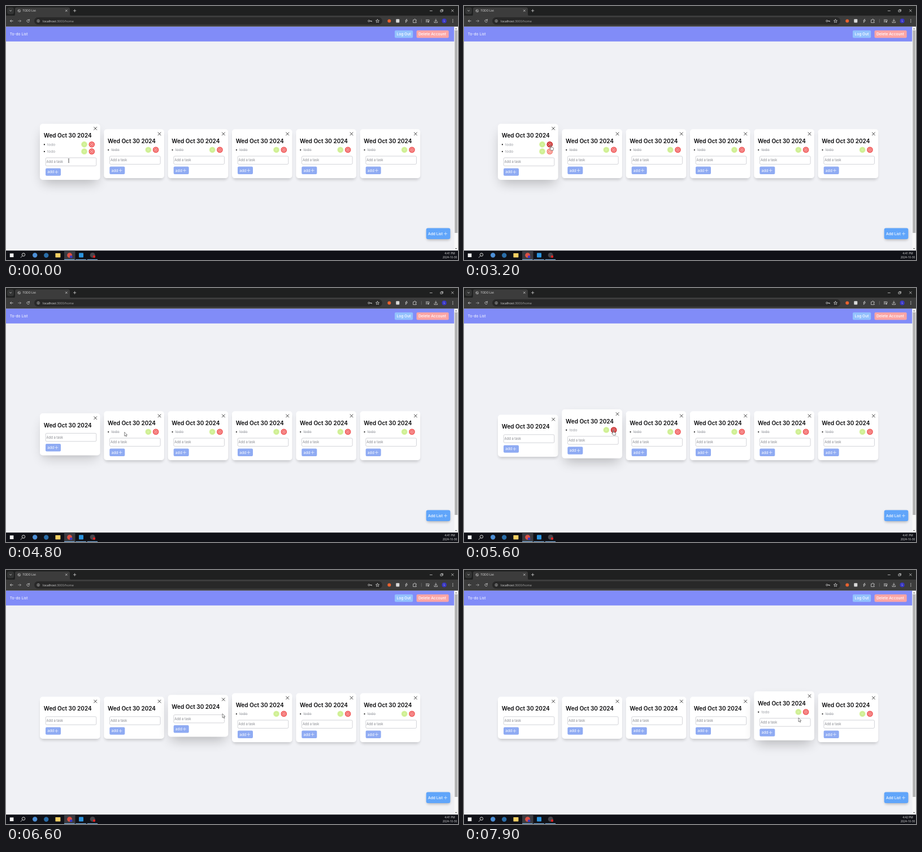
These frames come from a looping animation (800 by 450 pixels, 8 s). An HTML page:

```html
<!DOCTYPE html>
<html lang="en">
<head>
<meta charset="utf-8">
<title>To-do List</title>
<style>
  html, body { margin: 0; width: 100%; height: 100%; overflow: hidden; background: #f0f1f5; }
  svg { display: block; width: 100vw; height: 100vh; }
  text { font-family: Inter, sans-serif; font-size: 6.67px; white-space: pre; }
  .ui { font-family: "Open Sans", sans-serif; font-size: 5px; fill: #e3e3e3; }
  .line { fill: none; stroke: #d0d0d0; stroke-width: .8; stroke-linecap: round; stroke-linejoin: round; }
  .title { font-size: 10px; font-weight: 600; fill: #08080a; }
  .hint { font-size: 5.83px; fill: #85878d; }
  .white { fill: #fff; }
  .plus { stroke: #fff; stroke-width: .6; }
</style>
</head>
<body>
<svg id="stage" viewBox="0 0 800 450" xmlns="http://www.w3.org/2000/svg"></svg>
<script>
const LOOP = 8000, STEP = 100;
const CARD_W = 106.6, PITCH = 113.33, MID_Y = 261.7;
const BASE_H = 74.4, ROW_H = 12.4, LIFT = 3.33;
const RED_X = 91.8, GREEN_X = 78.5, ROW_Y = 36.5;

// Per card: pointer enters, pointer leaves, clicks that each remove a task
const cards = [
  { enter: -999, leave: 4720, tasks: 2, clicks: [4000, 4400] },
  { enter: 4790, leave: 5960, tasks: 1, clicks: [5800] },
  { enter: 6030, leave: 6660, tasks: 1, clicks: [6450] },
  { enter: 6710, leave: 7560, tasks: 1, clicks: [7200] },
  { enter: 7590, leave: 9999, tasks: 1, clicks: [] },
  { enter: 9999, leave: 9999, tasks: 1, clicks: [] }
];

// Pointer path: time, x, y
const path = [
  [0, 111, 274], [400, 124, 269], [900, 152, 264], [1200, 154.5, 263],
  [1350, 154.5, 263], [1700, 154, 254.5], [2700, 154, 254.5], [2900, 154, 247],
  [4660, 154, 247], [4800, 209.7, 255.3], [5100, 245, 256], [5500, 264, 252],
  [5850, 264, 252], [6200, 377.5, 251.5], [6500, 377.5, 251.5], [6600, 383, 254.6],
  [6850, 484, 254], [7000, 491, 252], [7500, 491, 252], [7700, 575, 258], [7900, 592, 261.8]
];

const clamp = v => Math.max(0, Math.min(1, v));
const rect = (x, y, w, h, fill, r = 0, more = '') =>
  `<rect x="${x}" y="${y}" width="${w}" height="${h}" rx="${r}" fill="${fill}" ${more}/>`;
const dot = (x, y, r, fill, more = '') => `<circle cx="${x}" cy="${y}" r="${r}" fill="${fill}" ${more}/>`;
const text = (x, y, s, more = '') => `<text x="${x}" y="${y}" ${more}>${s}</text>`;
const line = (d, more = '') => `<path class="line" d="${d}" ${more}/>`;
const plus = (x, y) => `<path class="plus" d="M${x - 3} ${y}h6m-3-3v6"/>`;
const cross = (x, y, r, more) =>
  line(`M${x - r} ${y - r}l${2 * r} ${2 * r}m0 ${-2 * r}l${-2 * r} ${2 * r}`, more);

// Tailwind's default easing: cubic-bezier(.4, 0, .2, 1)
function ease(x) {
  x = clamp(x);
  let lo = 0, hi = 1;
  for (let i = 0; i < 20; i++) {
    const s = (lo + hi) / 2;
    const bx = 1.2 * s * (1 - s) ** 2 + .6 * s * s * (1 - s) + s ** 3;
    if (bx < x) lo = s; else hi = s;
  }
  return lo * lo * (3 - 2 * lo);
}

function browser() {
  return rect(0, 0, 800, 18, '#1f2020') +
    rect(2, 2.5, 12, 12, '#343535', 3.5) + line('M6.5 7.7l1.6 1.5 1.6-1.5') +
    `<path d="M13 17.5q3 0 3-3V5.5q0-3 3-3h91q3 0 3 3v9q0 3 3 3z" fill="#3c3c3c"/>` +
    dot(23.3, 8.5, 2.3, 'none', 'stroke="#c4c4c4" stroke-width=".7"') +
    line('M21.3 8.2h2l1.2 2', 'stroke-width=".6"') +
    text(29.5, 10.3, 'TODO List', 'class="ui"') +
    cross(106.8, 8.3, 1.5) + line('M119.4 8.3h4.4m-2.2-2.2v4.4') +
    line('M750.3 8.6h4') + line('M769.3 7.3h3v3h-3zM770.4 6.3h3v3') + cross(790.3, 8.3, 1.8) +
    rect(0, 17, 800, 19.5, '#3c3c3c') + rect(50, 20, 616, 13, '#282828', 6.5) +
    line('M12.2 26.5h-4.8m2-2l-2 2 2 2') +
    line('M21.6 26.5h4.8m-2-2l2 2-2 2', 'opacity=".65"') +
    line('M41 25a2.3 2.3 0 1 0 .4 2.2M41.3 23.6v1.8h-1.8') +
    dot(57.2, 26.5, 2.3, 'none', 'stroke="#cfcfcf" stroke-width=".6"') + line('M57.2 26.3v1.4m0-2.5v.1') +
    text(65, 28.5, 'localhost<tspan fill="#a5a5a5">:3000/home</tspan>', 'class="ui" style="font-size:5.6px"') +
    dot(642.3, 26.5, 1.5, 'none', 'stroke="#d0d0d0" stroke-width=".8"') + line('M643.9 26.5h3.4v1.2m-1.3-1.2v1') +
    line('M657.5 23.6l.9 2 2.1.2-1.6 1.4.5 2.1-1.9-1.1-1.9 1.1.5-2.1-1.6-1.4 2.1-.2z', 'stroke-width=".6"') +
    dot(678.3, 26.4, 3, '#e8622f') + rect(690.3, 23.2, 6, 6.4, '#d9d9d9', 1) +
    line('M707.4 29l.6-2.5-1.2-.2 2.2-3 .3 0-.4 2.2 1.2.2z', 'stroke-width=".7"') +
    line('M721 24.6h1.6q0-1.6 1-1.6t1 1.6h1.6v1.5q-1.3 0-1.3 1t1.3 1v1.4H721z') +
    line('M735.3 23.6v5.6', 'opacity=".35"') +
    line('M743.3 24.4h4.6m-4.6 1.9h3m-3 1.9h2') + dot(747.5, 28.2, 1.1, '#d0d0d0') + line('M748.4 28v-3h1') +
    line('M760.8 23.2v4m-1.8-1.6l1.8 1.7 1.8-1.7M758 27.7v1.7h5.6v-1.7') +
    dot(775.6, 26.4, 4.1, '#3937c4') + text(775.6, 28.1, 'L', 'class="ui" text-anchor="middle" style="font-size:4.4px"') +
    [24, 26.4, 28.8].map(y => dot(790.8, y, .7, '#d6d6d6')).join('');
}

function page() {
  return rect(0, 36.5, 793.4, 26.3, '#818cf8') +
    text(6.7, 52.2, 'To-do List', 'class="white"') +
    rect(688, 43.2, 32.2, 13.2, '#93c1fd', 2) + text(691.4, 52.2, 'Log Out', 'class="white" font-weight="500"') +
    rect(726.6, 43.2, 57, 13.2, '#fca5a5', 2) + text(730, 52.2, 'Delete Account', 'class="white" font-weight="500"') +
    rect(793.4, 36.5, 6.6, 397, '#f8f8f8') + rect(794.2, 43, 5, 359, '#b2b2b2') +
    `<path d="M794.9 41.2l1.7-2 1.7 2zM794.9 429l1.7 2 1.7-2z" fill="#606060"/>` +
    rect(745, 396, 40.5, 18.5, '#000', 3, 'opacity=".28" filter="url(#soft)"') +
    rect(743.7, 393.6, 42.6, 19.4, '#60a5fa', 3) +
    text(747, 405.9, 'Add List', 'class="white" font-weight="500"') + plus(778, 403.4);
}

function taskbar() {
  const active = [103, 123.3, 143.6].map(x => rect(x, 448.8, 18.5, 1.2, '#7eb0de')).join('');
  return rect(0, 433.3, 800, 16.7, '#101117') + rect(103, 433.3, 19.5, 16.7, '#3a3b41') + active +
    rect(6.8, 438.4, 6.6, 6.6, '#f2f2f2') +
    dot(31, 440.6, 2.7, 'none', 'stroke="#eee" stroke-width=".9"') + line('M29.1 442.6l-3 3', 'style="stroke:#eee"') +
    dot(51.2, 441.5, 4.2, '#4d8fd6') + dot(71.2, 441.7, 4.2, '#2a6da8') +
    rect(87.4, 438, 9, 7.4, '#f4cf63', .6) + dot(112.6, 441.6, 4.4, '#dc5044') +
    dot(115.2, 444.2, 2.3, '#3937c4') + rect(129, 437.6, 8, 8, '#2b94de', 1) +
    dot(153.2, 441.4, 4.5, '#47464c') + dot(156, 444, 2.2, '#e02424') +
    text(785.5, 439.6, '', 'id="clock" class="ui" text-anchor="middle" style="font-size:4.9px"') +
    text(785.5, 447.4, '2024-10-30', 'class="ui" text-anchor="middle" style="font-size:4.9px"');
}

function row() {
  return `<g class="row">` + dot(7.9, ROW_Y + .2, 1.1, '#111') +
    text(13.1, ROW_Y + 2.4, 'todo', 'fill="#a7a9af"') +
    rect(13.1, ROW_Y + .1, 14.8, .6, '#a0a2a8', 0, 'class="strike"') +
    dot(GREEN_X, ROW_Y, 5.4, '#d6f3a0') + dot(GREEN_X, ROW_Y, 3.2, 'none', 'stroke="#c0e67c" stroke-width=".7"') +
    dot(RED_X, ROW_Y, 5.3, '#f05252', 'class="remove"') +
    dot(RED_X, ROW_Y, 3.2, 'none', 'stroke="#fff" stroke-width=".7" opacity=".85"') +
    cross(RED_X, ROW_Y, 1.1, 'style="stroke:#fff"') + `</g>`;
}

function card(c) {
  return `<g class="card">` +
    rect(5, 15.4, CARD_W - 10, 1, '#000', 5, 'class="far" filter="url(#wide)"') +
    rect(1.2, 5.2, CARD_W - 2.4, 1, '#000', 5, 'class="near" filter="url(#soft)"') +
    rect(0, 0, CARD_W, 1, '#fff', 5, 'class="body"') +
    cross(98.2, 8.2, 2.5, 'style="stroke:#111"') +
    text(6.7, 24.6, 'Wed Oct 30 2024', 'class="title"') +
    row().repeat(c.tasks) +
    `<g class="form">` +
    rect(10.2, 35.3, 89.6, 14.4, '#fff', 2, 'stroke="#b6b8be" stroke-width=".6"') +
    text(11.6, 44.7, 'Add a task', 'class="hint"') +
    rect(10, 53.9, 27, 13.4, '#8fabf3', 2) + text(13.2, 62.9, 'add', 'class="white"') + plus(29.3, 60.6) +
    `</g></g>`;
}

function pointers() {
  const ink = 'fill="#fff" stroke="#222" stroke-width=".55" stroke-linejoin="round"';
  return `<g id="pointer">
    <path data-kind="arrow" ${ink} d="M0 0v7l1.6-1.4 1.1 2.4 1.1-.5-1-2.4h2.1z"/>
    <path data-kind="hand" ${ink} d="M-.7 .3q.7-.8 1.4 0v3l3.2 .7q.8 .3 .7 1.2l-.6 3.6h-3.9l-2.5-3.2q.1-.9 1-.6l.7 .5z"/>
    <path data-kind="beam" fill="none" stroke="#666" stroke-width=".7" d="M-1.2-3.6q1.2 0 1.2 .7v5.8q0 .7-1.2 .7m2.4 0q-1.2 0-1.2-.7v-5.8q0-.7 1.2-.7"/>
  </g>`;
}

const stage = document.getElementById('stage');
stage.innerHTML = `<defs>
    <filter id="wide" x="-50%" y="-60%" width="200%" height="220%"><feGaussianBlur stdDeviation="10.4"/></filter>
    <filter id="soft" x="-30%" y="-30%" width="160%" height="160%"><feGaussianBlur stdDeviation="2.4"/></filter>
  </defs>` + rect(0, 0, 800, 450, '#f0f1f5') + page() + cards.map(card).join('') +
  browser() + taskbar() + pointers();

const clock = stage.querySelector('#clock');
const pointer = stage.querySelector('#pointer');
stage.querySelectorAll('.card').forEach((g, i) => {
  const c = cards[i], find = s => g.querySelector(s);
  Object.assign(c, {
    g, x: 60 + PITCH * i, far: find('.far'), near: find('.near'), body: find('.body'),
    form: find('.form'), rows: [...g.querySelectorAll('.row')]
  });
});

function pointerAt(t) {
  const k = path.findIndex(p => p[0] > t);
  if (k < 0) return path[path.length - 1].slice(1);
  const [t0, x0, y0] = path[k - 1], [t1, x1, y1] = path[k];
  const u = (t - t0) / (t1 - t0);
  return [x0 + (x1 - x0) * u, y0 + (y1 - y0) * u];
}

function draw(t) {
  const [px, py] = pointerAt(t);
  let kind = 'arrow';

  for (const c of cards) {
    const n = c.tasks - c.clicks.filter(k => t >= k).length;
    const lift = ease((t - c.enter) / 300) * (1 - ease((t - c.leave) / 300));
    const h = BASE_H + ROW_H * n;
    const top = MID_Y - h / 2 - LIFT * lift;
    c.g.setAttribute('transform', `translate(${c.x} ${top})`);
    c.body.setAttribute('height', h);
    c.far.setAttribute('height', h - 10);
    c.far.setAttribute('opacity', .25 * lift);
    c.near.setAttribute('height', h - 2.4);
    c.near.setAttribute('opacity', .16 * (1 - lift));
    c.form.setAttribute('transform', `translate(0 ${ROW_H * n})`);

    c.rows.forEach((r, j) => {
      r.setAttribute('visibility', j < n ? 'visible' : 'hidden');
      r.setAttribute('transform', `translate(0 ${ROW_H * j})`);
      r.querySelector('.strike').setAttribute('opacity', 1 - .7 * lift);
      const cy = top + ROW_Y + ROW_H * j;
      const over = x => j < n && Math.hypot(px - c.x - x, py - cy) < 5.4;
      const hot = over(RED_X);
      if (hot || over(GREEN_X)) kind = 'hand';
      const idle = j === 1 && t >= 2800 ? '#f78379' : '#f05252';
      r.querySelector('.remove').setAttribute('fill', hot ? '#c81e1e' : idle);
    });

    const dx = px - c.x, dy = py - top - ROW_H * n;
    if (dx > 10 && dx < 100 && dy > 35 && dy < 50) kind = 'beam';
  }

  pointer.setAttribute('transform', `translate(${px} ${py})`);
  for (const p of pointer.children) p.setAttribute('visibility', p.dataset.kind === kind ? 'visible' : 'hidden');
  clock.textContent = t < 7700 ? '4:41 PM' : '4:42 PM';
}

const start = performance.now();
function tick() {
  const t = (performance.now() - start) % LOOP;
  draw(Math.floor(t / STEP) * STEP);
  requestAnimationFrame(tick);
}
tick();
</script>
</body>
</html>
```
